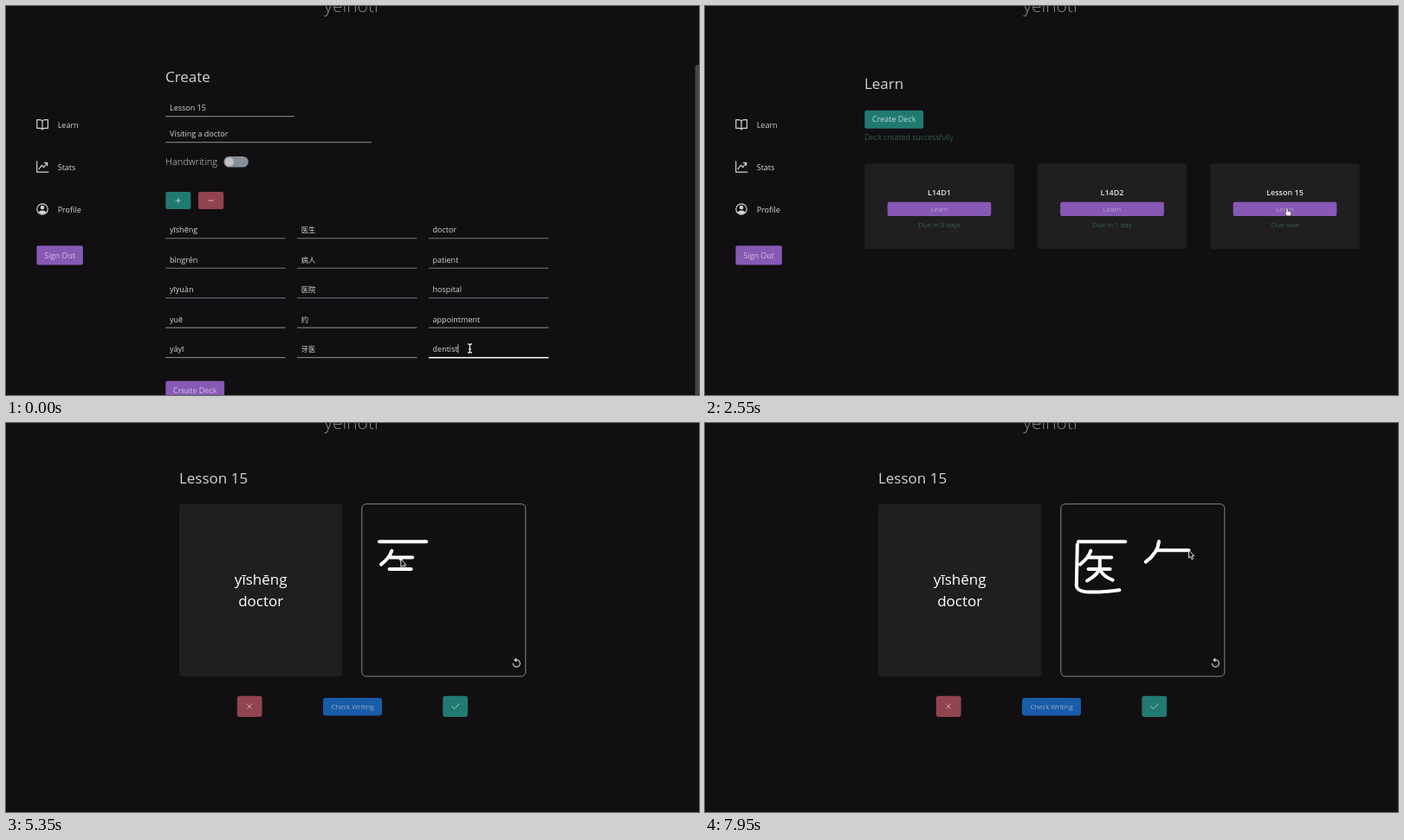
These frames come from a looping animation (800 by 450 pixels, 8000 ms). An HTML page:

```html
<!DOCTYPE html>
<html lang="en">
<head>
<meta charset="utf-8">
<title>Flashcards</title>
<style>
  html, body { margin: 0; width: 100%; height: 100%; overflow: hidden; background: #110f12; }
  svg { display: block; width: 100%; height: 100%; }
  text { font: 400 9px "Open Sans", "Noto Sans CJK SC", "Noto Sans", sans-serif; fill: #d6d4d6; white-space: pre; }
  .light { font-weight: 300; }
  .small { font-size: 8px; font-weight: 300; }
  .bold { font-weight: 600; fill: #e2e0e2; }
  .heading { font-size: 17px; }
  .word { font-size: 17px; fill: #fff; }
  .hanzi { font-family: "Noto Sans CJK SC", "Noto Sans CJK", sans-serif; font-size: 8.3px; }
  .mid { text-anchor: middle; }
  .green { fill: #3f8a5c; }
  .lilac { fill: #d3c0e0; }
  .pale { fill: #b9d3d0; }
  .line { fill: none; stroke: #d6d4d6; stroke-linecap: round; stroke-linejoin: round; }
  #ink { fill: none; stroke: #fff; stroke-width: 4; stroke-linecap: round; stroke-linejoin: round; }
</style>
</head>
<body>
<svg id="stage" viewBox="0 0 800 450">
  <rect width="800" height="450" fill="#110f12"/>
  <text x="398.5" y="7" class="light mid" style="font-size:21px;fill:#8b898c">yelnoti</text>

  <g id="sidebar">
    <g class="line" stroke-width="1.2">
      <path d="M42 133.2Q41 131.6 39 131.6H35.8V141.4H39.5Q41.5 141.4 42 143Q42.5 141.4 44.5 141.4H48.4V131.6H45Q43 131.6 42 133.2V142.4"/>
      <path d="M35.7 179.8V192.2H48.8M38 188.6L41.4 184.2L43.6 186.6L47.4 181.6M44.4 181.4H47.7V184.6"/>
      <circle cx="42" cy="235" r="6.2"/>
    </g>
    <path fill="#d6d4d6" d="M42 230.8a2.3 2.3 0 0 1 0 4.6a2.3 2.3 0 0 1 0-4.6M37.6 238.6Q39 236.6 42 236.6T46.4 238.6Q44.8 240.9 42 240.9T37.6 238.6"/>
  </g>

  <g id="create">
    <rect x="795.5" y="68" width="6" height="390" rx="2" fill="#454446"/>
    <text x="184" y="88" class="heading">Create</text>
    <text x="184" y="184" class="light" style="font-size:11px">Handwriting</text>
    <rect id="track" x="251.4" y="174" width="28.4" height="12.6" rx="6.3"/>
    <circle id="knob" cy="180.3" r="5.1" fill="#c3bfbf"/>
    <path id="focus" d="M488 406.7H626.3" stroke="#f2f2f2" stroke-width="1.5"/>
    <path id="caret" d="M521.9 391.5V401.5" stroke="#e8e8e8" stroke-width=".8"/>
  </g>

  <g id="learn">
    <text x="184" y="96" class="heading">Learn</text>
    <text x="184" y="154.8" class="light green">Deck created successfully</text>
    <g id="newDeck"></g>
  </g>

  <g id="study">
    <text x="200" y="69.5" class="heading">Lesson 15</text>
    <rect x="200" y="93.7" width="188.3" height="199.5" rx="3.5" fill="#201e21"/>
    <text x="294.2" y="187" class="word mid">yīshēng</text>
    <text x="294.2" y="212" class="word mid">doctor</text>
    <rect x="410.8" y="93.7" width="189" height="199.4" rx="5" fill="none" stroke="#a3a1a3" stroke-width=".8"/>
    <path class="line" stroke-width="1.2" d="M585.4 278.4A4 4 0 1 0 589.3 274.2H587.2"/>
    <path d="M589.3 271.6V276.8L586.3 274.2Z" fill="#d6d4d6"/>
    <g id="ink"></g>
  </g>

  <g id="cursor">
    <path id="ibeam" d="M-2.4 -5Q0 -5 0 -3.4Q0 -5 2.4 -5M0 -3.6V3.6M-2.4 5Q0 5 0 3.4Q0 5 2.4 5M-1.3 1H1.3" fill="none" stroke="#eee" stroke-width="1.3"/>
    <path id="arrow" d="M0 0V9L2 7.2L3.5 10.5L5 9.8L3.6 6.6H6.2Z" fill="#111" stroke="#f2f2f2" stroke-width=".9" stroke-linejoin="round"/>
    <path id="hand" d="M-1 0Q0 -1 1 0V3.2L4 4Q5 4.4 4.8 5.6L4 8.8H-.4L-2.8 5.4Q-3 4.2 -1 5Z" fill="#fff" stroke="#222" stroke-width=".6"/>
  </g>
</svg>
<script>
const $ = id => document.getElementById(id);

function add(parent, tag, attrs, content = '') {
  const el = document.createElementNS('http://www.w3.org/2000/svg', tag);
  for (const name in attrs) el.setAttribute(name, attrs[name]);
  el.textContent = content;
  return parent.appendChild(el);
}
const label = (parent, x, y, content, cls = '') => add(parent, 'text', { x, y, class: cls }, content);
const box = (parent, x, y, width, height, fill, rx = 2) => add(parent, 'rect', { x, y, width, height, fill, rx });
const icon = (parent, d, stroke) => add(parent, 'path', { d, class: 'line', style: `stroke:${stroke};stroke-width:.9` });

function button(parent, x, y, w, h, fill, content, cls) {
  box(parent, x, y, w, h, fill);
  label(parent, x + w / 2, y + h / 2 + 3.2, content, 'mid ' + cls);
}

const PURPLE = '#8759b5', TEAL = '#217a72', RED = '#91444f';

// Sidebar
['Learn', 'Stats', 'Profile'].forEach((name, i) => label($('sidebar'), 59.7, 140.5 + 49 * i, name));
button($('sidebar'), 35.4, 277.3, 53.4, 22.2, PURPLE, 'Sign Out', 'lilac');

// Deck form
const form = add($('create'), 'g', {});
$('create').insertBefore(form, $('focus'));
function field(x, y, width, content, cls) {
  label(form, x + 4.7, y - 6.6, content, cls);
  add(form, 'path', { d: `M${x} ${y}h${width}`, stroke: '#7b797c', 'stroke-width': 1.1 });
}
field(184.3, 127.6, 148.5, 'Lesson 15');
field(184.3, 157.6, 237.3, 'Visiting a doctor');
box(form, 184.3, 215, 29, 20, TEAL);
box(form, 222, 215, 29.2, 20, RED);
icon(form, 'M196 225h5.6M198.8 222.2v5.6', '#b9d3d0');
icon(form, 'M234 225h5.4', '#dcbcc0');
[
  ['yīshēng', '医生', 'doctor'],
  ['bìngrén', '病人', 'patient'],
  ['yīyuàn', '医院', 'hospital'],
  ['yuē', '约', 'appointment'],
  ['yáyī', '牙医', 'dentist']
].forEach((row, r) => row.forEach((word, c) =>
  field(184.3 + 151.8 * c, 268.8 + 34.45 * r, 138.4, word, c === 1 ? 'hanzi' : '')));
button(form, 184.3, 433.8, 67.8, 22, PURPLE, 'Create Deck', 'lilac');

// Deck list
function deck(parent, x, title, due) {
  const mid = x + 86.2;
  box(parent, x, 182.3, 172.4, 98.8, '#201e21', 3);
  label(parent, mid, 219, title, 'bold mid');
  box(parent, x + 26.4, 226.8, 119.6, 16.2, PURPLE);
  label(parent, mid, 237.8, 'Learn', 'small mid lilac');
  label(parent, mid, 256.2, due, 'small mid green');
}
button($('learn'), 184.3, 120.7, 67.8, 21, TEAL, 'Create Deck', 'pale');
deck($('learn'), 184.3, 'L14D1', 'Due in 3 days');
deck($('learn'), 383.8, 'L14D2', 'Due in 1 day');
deck($('newDeck'), 583.3, 'Lesson 15', 'Due now');

// Study controls
box($('study'), 266.8, 315.8, 28.8, 24.2, RED, 3);
icon($('study'), 'M278.8 325.6l4.6 4.6M283.4 325.6l-4.6 4.6', '#dcbcc0');
box($('study'), 366, 318, 68, 20.5, '#195ca8', 3);
label($('study'), 400, 331, 'Check Writing', 'small mid');
box($('study'), 504.3, 315.8, 28.8, 24.2, TEAL, 3);
icon($('study'), 'M514.8 328l2.8 2.6l5.4-5.6', '#b9d3d0');

// Handwriting: path, start and end time
const strokes = [
  ['M431 137.2H485.2', 3560, 3950],
  ['M445.3 147.8Q443 156 433 163.6', 4150, 4350],
  ['M443 155.4H469.2', 4520, 4760],
  ['M442.6 169H467.6', 4940, 5150],
  ['M455.8 156.5V166Q455 175 441 182.4', 5320, 5600],
  ['M457 171.5Q461 178 470.6 181.6', 5740, 5920],
  ['M429.8 140.5L428.8 188Q429 194 439 195.2Q455 196.5 478.4 193.2', 6450, 7000],
  ['M524 137Q523 150 508.8 160.6', 7370, 7600],
  ['M522.5 147.2H558.5', 7720, 7920]
].map(([d, start, end]) => {
  const el = add($('ink'), 'path', { d, pathLength: 1, 'stroke-dasharray': '1 2' });
  const length = el.getTotalLength();
  const at = p => { const q = el.getPointAtLength(p * length); return [q.x, q.y]; };
  return { el, start, end, at };
});

// Pointer stops: time, x, y
const stops = [
  [0, 535.5, 396], [950, 535.5, 396], [1400, 267, 181], [1550, 267, 181],
  [1750, 222, 440], [1850, 222, 440], [1950, 228, 434.7], [2150, 228, 434.7],
  [2550, 672, 234], [2750, 672, 234], [2900, 700.5, 218.5], [2950, 700.5, 218.5],
  [3450, 431, 137.2]
];
for (const s of strokes) stops.push([s.start, ...s.at(0)], [s.end, ...s.at(1)]);

const progress = (t, a, b) => Math.min(1, Math.max(0, (t - a) / (b - a)));
const ease = p => p * p * (3 - 2 * p);
const mix = (a, b, p) => a + (b - a) * p;
const show = (id, on) => { $(id).style.display = on ? '' : 'none'; };

function pointer(t) {
  const active = strokes.find(s => t >= s.start && t <= s.end);
  if (active) return active.at(ease(progress(t, active.start, active.end)));
  const next = stops.findIndex(s => s[0] > t);
  if (next < 0) return stops[stops.length - 1].slice(1);
  const a = stops[next - 1], b = stops[next];
  const p = ease(progress(t, a[0], b[0]));
  return [mix(a[1], b[1], p), mix(a[2], b[2], p)];
}

function draw(t) {
  show('create', t < 1850);
  show('learn', t >= 1850 && t < 2800);
  show('newDeck', t >= 2100);
  show('study', t >= 2800);
  show('sidebar', t < 2800);

  show('focus', t < 1400);
  show('caret', t < 1400 && t % 1000 < 500);
  const on = ease(progress(t, 1400, 1600));
  $('knob').setAttribute('cx', mix(257.9, 273.2, on));
  $('track').setAttribute('fill', `rgb(${mix(134, 50, on)},${mix(142, 152, on)},${mix(154, 142, on)})`);

  for (const { el, start, end } of strokes) {
    el.style.display = t > start ? '' : 'none';
    el.setAttribute('stroke-dashoffset', 1 - ease(progress(t, start, end)));
  }

  const [x, y] = pointer(t);
  $('cursor').setAttribute('transform', `translate(${x} ${y})`);
  const hand = (t >= 1350 && t < 1600) || (t >= 1750 && t < 1850) || (t >= 2500 && t < 2800);
  show('ibeam', t < 1000);
  show('hand', hand);
  show('arrow', t >= 1000 && !hand);
}

const LOOP = 8000, STEP = 50;
const begin = performance.now();
function tick() {
  const t = (performance.now() - begin) % LOOP;
  draw(Math.floor(t / STEP) * STEP);
  requestAnimationFrame(tick);
}
tick();
</script>
</body>
</html>
```
